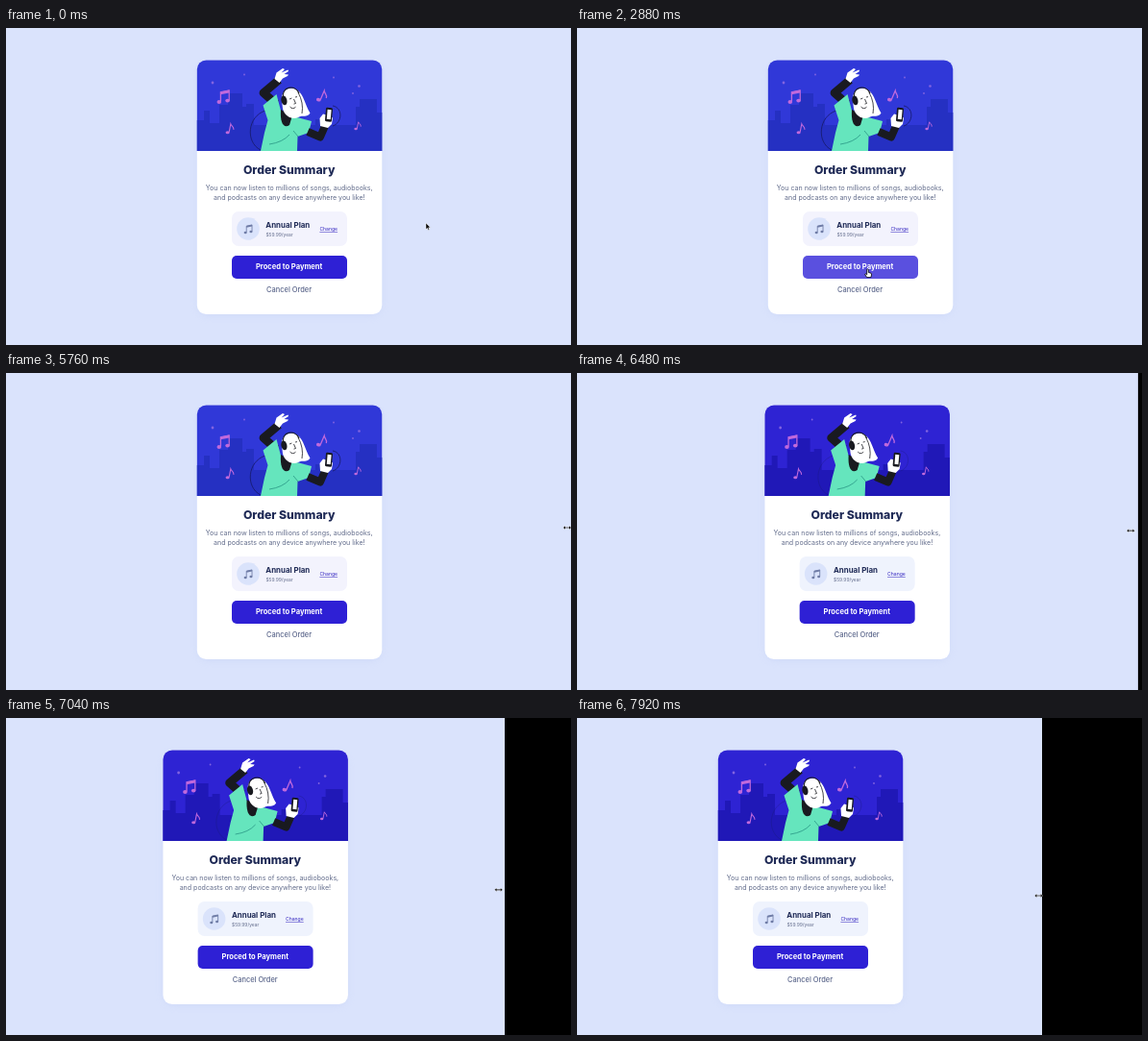
Recreate the animation shown at these times as an HTML page. Size 588x330 px, loop 8 s.

```html
<!DOCTYPE html>
<html lang="en">
<head>
<meta charset="utf-8">
<title>Order summary</title>
<style>
html, body { margin: 0; width: 100%; height: 100%; overflow: hidden; background: #dae3fc; }
svg { display: block; width: 588px; height: 330px; font-family: Inter, "Open Sans", sans-serif; }
.mid { text-anchor: middle; }
.navy { fill: #1f2a56; }
.gray { fill: #626c8b; }
.ink { fill: none; stroke: #191a20; }
</style>
</head>
<body>
<svg viewBox="0 0 588 330">
  <defs>
    <clipPath id="top"><rect x="198.8" y="33.4" width="192.5" height="120" rx="9.5"/></clipPath>
    <filter id="blur" x="-20%" y="-20%" width="140%" height="140%"><feGaussianBlur stdDeviation="4"/></filter>
    <g id="pair">
      <path d="M-3.6 4.6V-5.2L5.2 -7V3.2" fill="none" stroke="currentColor" stroke-width="1.3"/>
      <path d="M-3.6 -5.6L5.2 -7.4V-4.6L-3.6 -2.8z" fill="currentColor"/>
      <ellipse cx="-5.2" cy="5" rx="2.3" ry="1.9" fill="currentColor"/>
      <ellipse cx="3.6" cy="3.6" rx="2.3" ry="1.9" fill="currentColor"/>
    </g>
    <g id="single">
      <path d="M-1 4L1 -6C2 -3 5 -3 4.6 1" fill="none" stroke="currentColor" stroke-width="1.3"/>
      <ellipse cx="-2.8" cy="4.4" rx="2.4" ry="1.8" fill="currentColor"/>
    </g>
  </defs>
  <rect width="588" height="330" fill="#dae3fc"/>

  <g id="card">
    <rect x="200" y="38" width="190" height="261" rx="10" fill="#b9c6f0" opacity=".35" filter="url(#blur)"/>
    <rect x="198.8" y="33.4" width="192.5" height="264.6" rx="9.5" fill="#fff"/>

    <g clip-path="url(#top)">
      <rect id="sky" x="198" y="33" width="194" height="95"/>
      <path id="town" d="M198 128V96h8V86h6v13h10V80h9V68h15v14h4v-3h8v22h64V95h10v6h32V82h4v-8h18v14h10v40z"/>
      <g fill="#8264e0">
        <circle cx="215" cy="57" r="1.4"/><circle cx="248" cy="48.5" r=".9"/>
        <circle cx="341" cy="51.5" r=".9"/><circle cx="367.5" cy="60.5" r="1.3"/>
        <circle cx="361" cy="68" r=".9"/>
      </g>
      <g color="#c169dc">
        <use href="#pair" transform="translate(227 72)"/>
        <use href="#single" transform="translate(329 71) rotate(12)"/>
        <use href="#single" transform="translate(233 105) scale(.85)"/>
        <use href="#single" transform="translate(366 102) scale(.7)"/>
      </g>
      <g id="cord" fill="none" stroke="#171a66" stroke-width=".8">
        <path d="M270 86C251 92 249 119 265 127"/>
        <path d="M340 81C351 83 350 99 340 102"/>
      </g>
      <path class="ink" d="M284 54L268 67.5L281 79" stroke-width="8.8" stroke-linejoin="round"/>
      <path d="M279.5 53L281.5 46.5L288 42L290 43L286.5 46.5L293.5 43.5L294 45L289.5 48L294 48.5L293 50L288 52.5L284.5 57z" fill="#fff"/>
      <path d="M267.5 80.5L281.5 69L286 86L299 92L318 97L315 109L303.5 113L303 128H265L269 109L272.5 96z" fill="#65e5bd"/>
      <path d="M304 113L299 107M274 121Q288 119 295 111" fill="none" stroke="#218c7d" stroke-width=".7"/>
      <path d="M286 85L298 91L295 101C289 105 285 99 286 85z" fill="#191a20"/>
      <path d="M287 75C286 64 296 60 303 64.5C310 69 311 80 316.5 88.5C313 94 309 90 304 93C298 96 290 92 288 84z" fill="#fff"/>
      <path class="ink" d="M288.5 73C286 61 301 58 305 68" stroke-width="1.1"/>
      <ellipse cx="289.3" cy="75.5" rx="3" ry="5" fill="#191a20" transform="rotate(-12 289 75)"/>
      <path class="ink" d="M295 74l2.4-1M301 72l2-.4M299.5 74l2 4.5-2 .6M295.5 82q3 3.3 6 .2M304 67q6 11 4 22" stroke-width=".8"/>
      <path class="ink" d="M314 108L327 113.5L332 102" stroke-width="8" stroke-linejoin="round"/>
      <path d="M327 102L326.5 94L330 89.5L335 91L340 93.5L339 100L335 104z" fill="#fff"/>
      <g transform="rotate(5 336 90)">
        <rect x="332.5" y="83" width="7" height="14.5" rx="1.3" fill="#191a20"/>
        <rect x="334.2" y="85" width="4" height="10" fill="#fff"/>
      </g>
    </g>

    <text class="mid navy" x="294.7" y="152.4" font-size="12.2" font-weight="800">Order Summary</text>
    <g class="mid gray" font-size="7.06">
      <text x="294.7" y="168.7">You can now listen to millions of songs, audiobooks,</text>
      <text x="294.8" y="178.9">and podcasts on any device anywhere you like!</text>
    </g>

    <rect id="plan" x="235" y="191" width="120" height="36" rx="7"/>
    <circle cx="252" cy="209" r="11.8" fill="#dae3fb"/>
    <use href="#pair" color="#6f7ca6" transform="translate(252.6 209.6) scale(.66)"/>
    <text class="navy" x="270.3" y="207.8" font-size="7.9" font-weight="700">Annual Plan</text>
    <text class="gray" x="270.4" y="217" font-size="4.9">$59.99/year</text>
    <text id="change" x="326.4" y="211.2" font-size="5.1">Change</text>

    <rect id="pay" x="235" y="237" width="120" height="24" rx="5"/>
    <text class="mid" x="294.6" y="251.4" font-size="7.55" font-weight="700" fill="#fff">Proced to Payment</text>
    <text id="cancel" class="mid" x="294.6" y="275.4" font-size="7.45" font-weight="500">Cancel Order</text>
  </g>

  <rect id="void" width="588" height="330"/>

  <path id="arrow" d="M0 0V6.6L1.5 5.3L2.6 7.6L3.6 7.1L2.7 4.8H4.7z" stroke="#fff" stroke-width=".5"/>
  <path id="hand" d="M-.8 .4Q0 -.5 .8 .4V3.4L3.4 4.2Q4.2 4.6 4 6L3.4 8.6H-.8L-2.8 5.6Q-2.6 4.5 -1.6 5.1L-.8 5.8z" fill="#fff" stroke="#000" stroke-width=".8"/>
  <path id="resize" d="M-4.2 0L-2 -1.9V-.6H2V-1.9L4.2 0L2 1.9V.6H-2V1.9z" stroke="#fff" stroke-width=".4"/>
</svg>
<script>
const LOOP = 8000, STEP = 80, WIDTH = 588, DRAG = 6440;
const $ = id => document.getElementById(id);
const set = (id, name, value) => $(id).setAttribute(name, value);

// Pointer stops: time, x, y.
const stops = [
  [0, 437, 203], [800, 337, 209], [1680, 336, 209], [2080, 314, 245], [2880, 302.5, 251],
  [3520, 298, 272], [4280, 306, 276], [4480, 400, 281], [4640, 486, 240], [5200, 584, 161]
];
// Right border of the page while it is dragged: time, x.
const border = [[DRAG, WIDTH], [6800, 551], [7040, 519], [7280, 502], [7760, 484]];

function along(keys, t) {
  const i = Math.max(1, keys.findIndex(k => k[0] > t));
  const last = keys[keys.length - 1];
  if (t >= last[0]) return last.slice(1);
  const a = keys[i - 1], b = keys[i];
  const p = Math.max(0, (t - a[0]) / (b[0] - a[0]));
  return a.slice(1).map((v, n) => v + (b[n + 1] - v) * p);
}

const edge = t => along(border, t)[0];

function pointer(t) {
  if (t < DRAG) return along(stops, t);
  const x = edge(t + 40), p = (WIDTH - x) / 104;
  return [x - 3.5, 161 + 24 * p ** .8];
}

function draw(t) {
  const [x, y] = pointer(t);
  const over = (x0, y0, x1, y1) => x > x0 && x < x1 && y > y0 && y < y1;
  const onChange = over(325, 204, 346, 214);
  const onPay = over(235, 237, 355, 261);
  const onCancel = over(270, 267, 319, 279);
  const dragged = t >= DRAG;

  // The centred card runs slightly ahead of the border.
  set("card", "transform", `translate(${(edge(t + 25) - WIDTH) / 2} 0)`);
  set("void", "x", edge(t));
  set("sky", "fill", dragged ? "#2e23d3" : "#3038d8");
  set("town", "fill", dragged ? "#2018b7" : "#2530c2");
  set("plan", "fill", dragged ? "#eff3fd" : "#f3f3fd");
  set("cord", "opacity", dragged ? .35 : 1);
  set("pay", "fill", onPay ? "#5a50df" : "#2e20d5");
  set("change", "fill", onChange ? "#6b61e4" : "#3426c0");
  set("change", "text-decoration", onChange ? "none" : "underline");
  set("cancel", "fill", onCancel ? "#1f2a56" : "#5a658a");

  const kind = x > 581 || dragged ? "resize" : onChange || onPay || onCancel ? "hand" : "arrow";
  for (const id of ["arrow", "hand", "resize"]) {
    set(id, "visibility", id === kind ? "visible" : "hidden");
    set(id, "transform", `translate(${x} ${y})`);
  }
}

const start = performance.now();
function tick() {
  const t = (performance.now() - start) % LOOP;
  draw(Math.floor(t / STEP) * STEP);
  requestAnimationFrame(tick);
}
tick();
</script>
</body>
</html>
```
